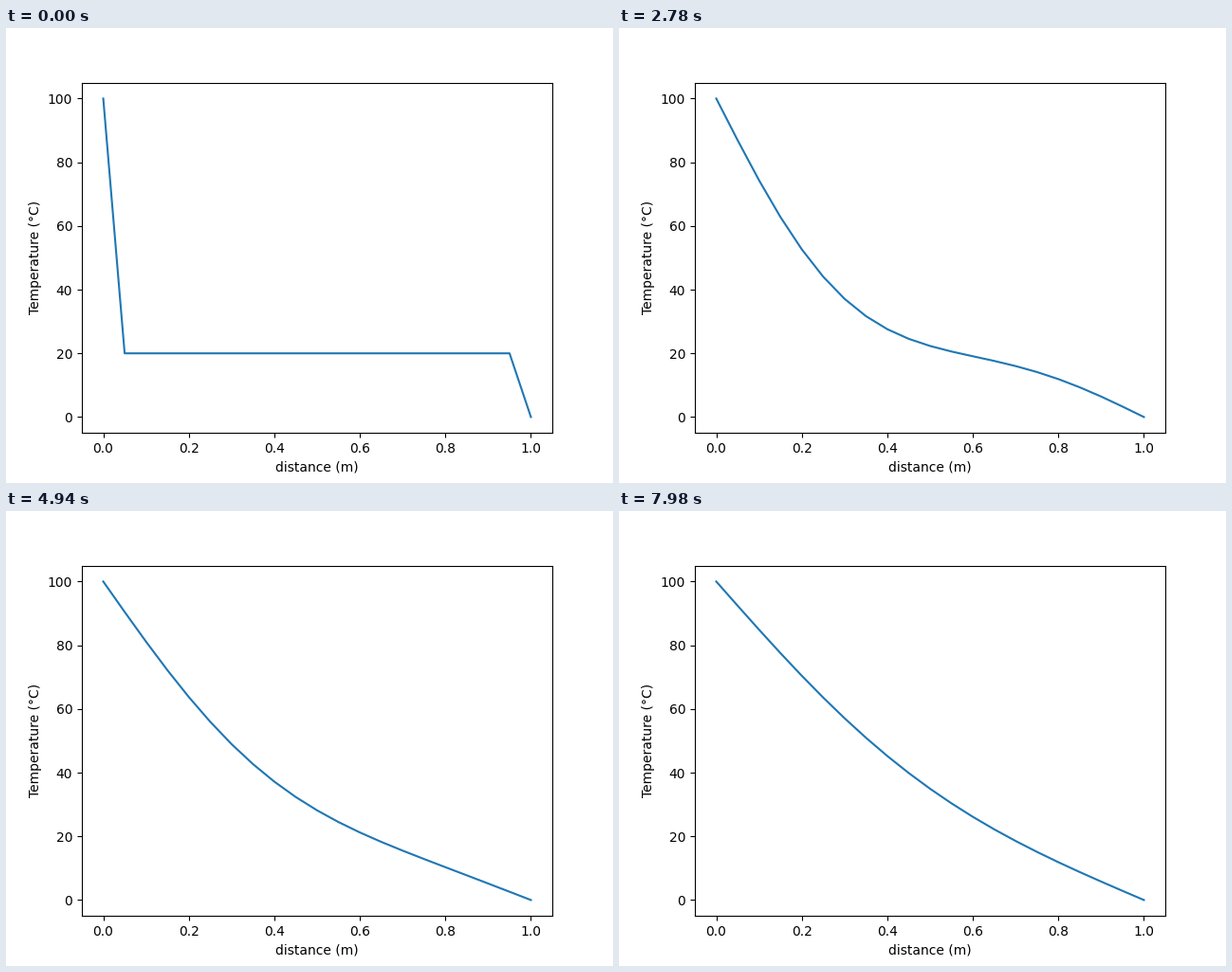
These frames come from a looping animation (640 by 480 pixels, 8 s). A matplotlib script:

```python
import matplotlib.pyplot as plt
import numpy as np
from matplotlib.animation import FuncAnimation

TICK = 20       # ms per animation frame
LOOP = 8000     # ms
HOLD = 500      # ms the initial profile stays
STEP = 40       # ms per diffusion step
R = 0.2         # diffusivity * dt / dx^2


def solve(steps, cells=20):
    """Explicit finite differences for a rod with fixed end temperatures."""
    temp = np.full(cells + 1, 20.0)
    temp[0], temp[-1] = 100, 0
    history = [temp]
    for _ in range(steps):
        temp = temp.copy()
        temp[1:-1] += R * np.diff(temp, 2)
        history.append(temp)
    return history


profiles = solve((LOOP - HOLD) // STEP + 1)
x = np.linspace(0, 1, len(profiles[0]))

fig, ax = plt.subplots(figsize=(6.4, 4.8), dpi=100)
line, = ax.plot(x, profiles[0], color="#1f77b4", lw=1.5)
ax.set_xlim(-0.05, 1.05)
ax.set_ylim(-5, 105)
ax.set_xlabel("distance (m)")
ax.set_ylabel("Temperature (°C)")


def update(frame):
    t = frame * TICK
    step = 0 if t < HOLD else (t - HOLD) // STEP + 1
    line.set_ydata(profiles[step])
    return line,


anim = FuncAnimation(fig, update, frames=LOOP // TICK, interval=TICK,
                     repeat=True, repeat_delay=0, blit=True)
plt.show()
```
